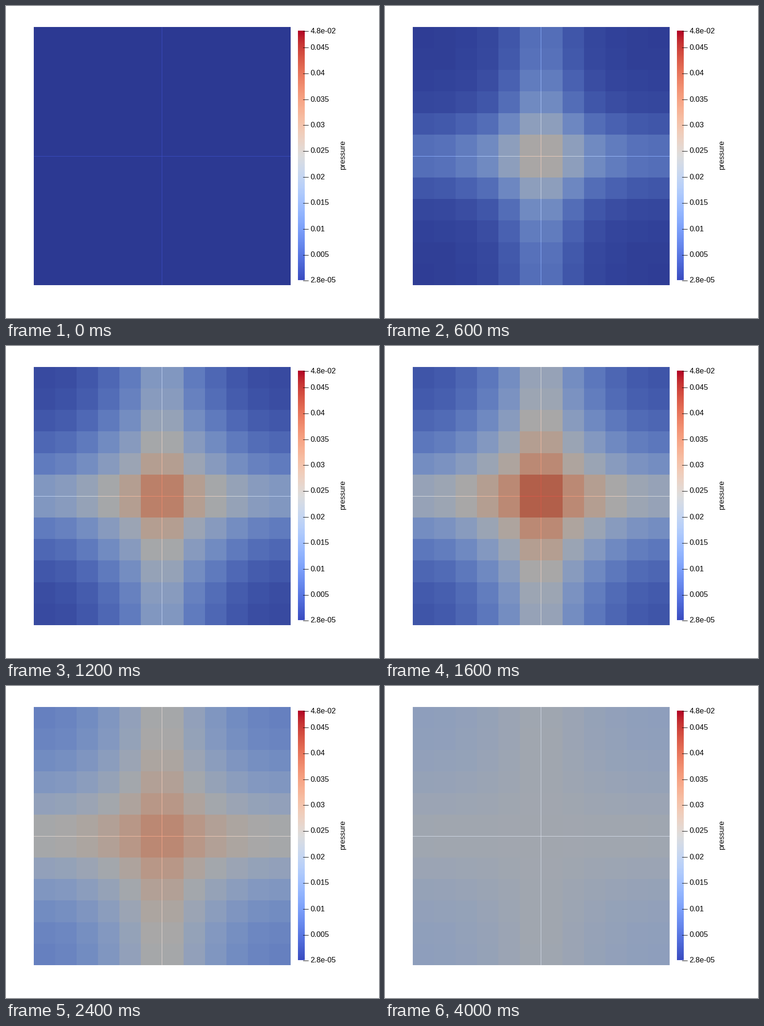
Recreate the animation shown at these times as a matplotlib script. Size 819x684 px, loop 4200 ms.

```python
import numpy as np
import matplotlib.pyplot as plt
from matplotlib.animation import FuncAnimation

W, H = 819, 684
FRAMES, STEP = 21, 200
LEFT, RIGHT, TOP, BOTTOM = 61, 625, 46, 612
SHADE = 0.76          # the lit surface is darker than the colour bar
STOP = 10             # the feed in the middle is shut off here
COOLWARM = plt.get_cmap("coolwarm")

# Pressure along the cross, from the centre outwards, while it is being fed.
FEED_STEPS = [0, 1, 2, 4, 6, 10]
FEED = np.array([
    [0, 0, 0, 0, 0, 0],
    [.29, .16, .095, .065, .05, .045],
    [.43, .285, .195, .15, .12, .105],
    [.59, .475, .35, .285, .235, .225],
    [.71, .575, .49, .415, .36, .335],
    [.915, .77, .66, .585, .53, .505],
])


def arm_pressure(n):
    if n <= STOP:
        return np.array([np.interp(n, FEED_STEPS, col) for col in FEED.T])
    t = n - STOP
    tip = .452 + .053 * np.exp(-.18 * t)
    return tip + (FEED[-1] - FEED[-1, -1]) * np.exp(-t / 2.58)


def corner_lag(n, arm):
    """How far the corners stay behind once the feed has stopped."""
    if n <= STOP:
        return 0
    corner = .45 - .31 * np.exp(-.155 * (n - STOP))
    return max(0, 2 * arm[-1] - arm[0] - corner)


def quadrant(n):
    arm = arm_pressure(n)
    reach = np.sin(np.pi * np.arange(6) / 10)
    field = np.add.outer(arm, arm) - arm[0]
    field -= corner_lag(n, arm) * np.outer(reach, reach)
    soft = .1 * np.clip(n / 2, .01, 1)
    field = soft * np.logaddexp(0, field / soft)
    field[0, :] = field[:, 0] = arm
    return field


def cross_pressure(n):
    extra = .075 * min(n, 1) * np.exp(-max(0, n - STOP) / 2.58)
    arm = arm_pressure(n) + extra
    return np.concatenate([arm[::-1], arm])


def mirror(q):
    half = np.hstack([q[:, ::-1], q])
    return np.vstack([half[::-1], half])


def rgb(values):
    return COOLWARM(np.clip(values, 0, 1))[..., :3]


fig = plt.figure(figsize=(W / 72, H / 72), dpi=72, facecolor="white")
ax = fig.add_axes([0, 0, 1, 1])
ax.axis("off")


def picture(data, left, right, top, bottom):
    return ax.imshow(data, extent=(left, right, bottom, top), origin="upper",
                     interpolation="nearest", aspect="auto")


cells = picture(np.zeros((12, 12, 3)), LEFT, RIGHT, TOP, BOTTOM)
across = picture(np.zeros((1, 12, 3)), LEFT, RIGHT, 329, 330)
upright = picture(np.zeros((12, 1, 3)), 342, 343, TOP, BOTTOM)

# Colour bar
BAR_TOP, BAR_BOTTOM = 54, 601
picture(rgb(np.linspace(1, 0, BAR_BOTTOM - BAR_TOP))[:, None],
        641, 656, BAR_TOP, BAR_BOTTOM)
FONT = dict(family="Liberation Sans", size=16.5, color="black")
P_MIN, P_MAX = 2.8e-5, .04817


def tick(value, label):
    y = BAR_BOTTOM - (value - P_MIN) / (P_MAX - P_MIN) * (BAR_BOTTOM - BAR_TOP)
    y = round(y)
    ax.plot([652, 664], [y + .5, y + .5], color="black", lw=1,
            solid_capstyle="butt")
    ax.text(668.5, y + 5.5, label, va="baseline", **FONT)


tick(P_MIN, "2.8e-05")
tick(P_MAX, "4.8e-02")
for k in range(1, 10):
    tick(k * .005, f"{k * .005:.3g}")
ax.text(743.5, 326, "pressure", rotation=90, rotation_mode="anchor",
        ha="center", va="baseline", **FONT)

ax.set_xlim(0, W)
ax.set_ylim(H, 0)


def update(n):
    cells.set_data(rgb(mirror(quadrant(n))) * SHADE)
    line = rgb(cross_pressure(n))
    across.set_data(line[None])
    upright.set_data(line[:, None])
    return cells, across, upright


anim = FuncAnimation(fig, update, frames=FRAMES, interval=STEP,
                     repeat=True, repeat_delay=0, init_func=lambda: update(0))
plt.show()
```
